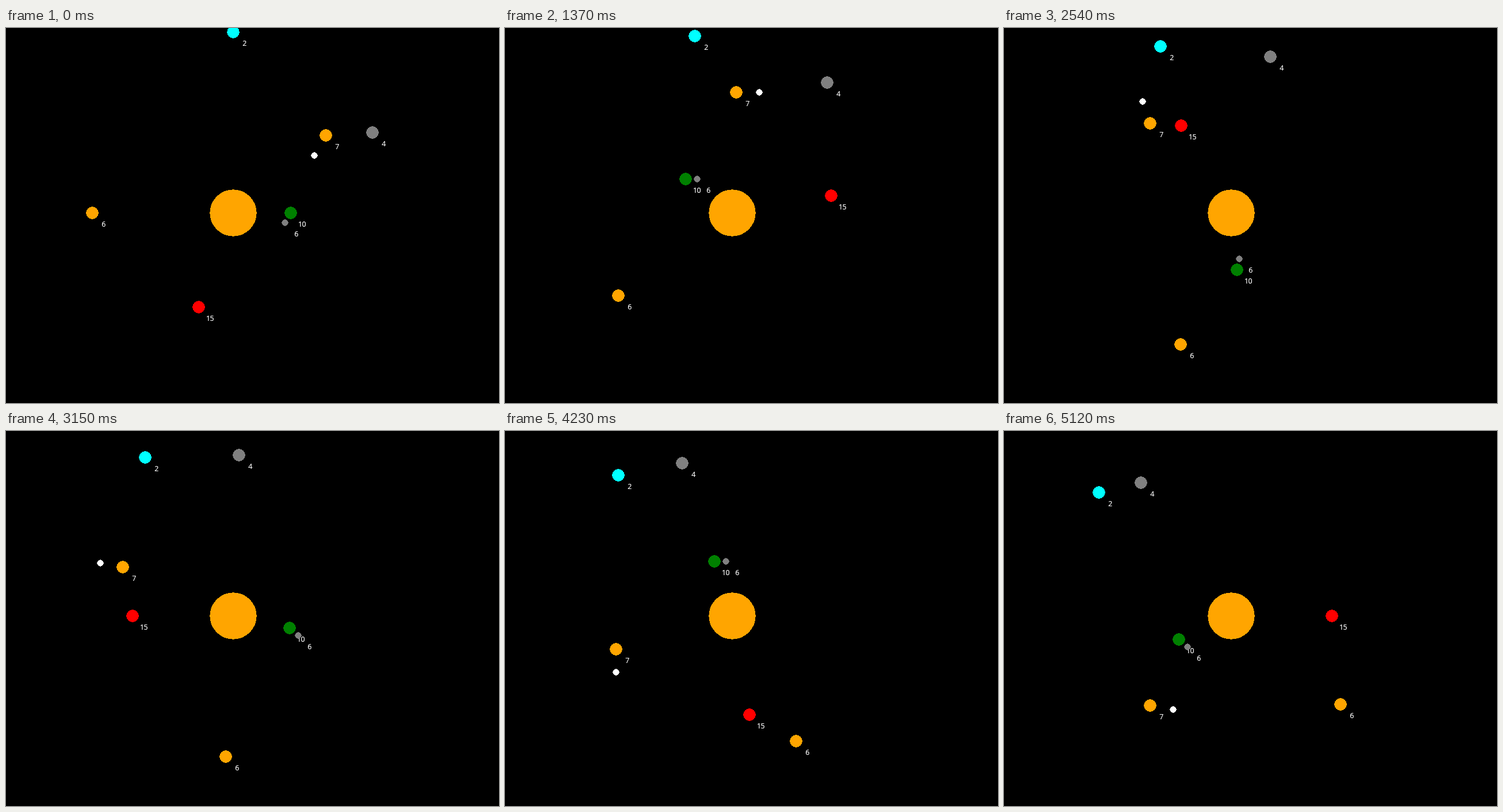
Animation, 857 px wide and 653 px high, one loop 5180 ms. Source, as an HTML page:

```html
<!DOCTYPE html>
<html lang="en">
<head>
<meta charset="utf-8">
<title>Orbits</title>
<style>
  html, body { margin: 0; width: 100%; height: 100%; overflow: hidden; background: #000; }
  svg { display: block; }
  circle { shape-rendering: crispEdges; }
  text {
    font: 12.4px "Open Sans", "Noto Sans", sans-serif;
    letter-spacing: -0.5px;
    fill: #fff;
    stroke: #fff;
    stroke-width: 0.2px;
    text-anchor: middle;
  }
</style>
</head>
<body>
<svg id="sky" width="857" height="653"></svg>
<script>
const LOOP = 5180, FRAME = 68.16;
const sky = document.getElementById("sky");

function add(tag, attrs) {
  const el = document.createElementNS("http://www.w3.org/2000/svg", tag);
  for (const name in attrs) el.setAttribute(name, attrs[name]);
  return sky.appendChild(el);
}

// Angles are in degrees, counterclockwise; speed is degrees per tick.
function body(color, size, parent, orbit, start, speed, label) {
  const dot = add("circle", { r: size + 0.7, fill: color });
  const text = label && add("text", {});
  if (text) text.textContent = label;
  return { dot, text, parent, orbit, start, speed, x: 395, y: 322 };
}

const sun = body("orange", 40, null, 0, 0, 0);
const green = body("green", 10, sun, 100, 0, 12, "10");
const greenMoon = body("gray", 5, green, 20, 240, 40, "6");
const red = body("red", 10, sun, 175, 250, 10, "15");
const amber = body("orange", 10, sun, 210, 40, 4, "7");
const whiteMoon = body("white", 5, amber, 40, 240, 10);
const outer = body("orange", 10, sun, 245, 180, 3, "6");
const gray = body("gray", 10, sun, 280, 30, 2, "4");
const cyan = body("cyan", 10, sun, 315, 90, 1, "2");
const bodies = [sun, green, greenMoon, red, amber, whiteMoon, outer, gray, cyan];

function place(b, tick) {
  if (b.parent) {
    const a = (b.start + b.speed * tick) % 360 * Math.PI / 180;
    b.x = b.parent.x + b.orbit * Math.cos(a);
    b.y = b.parent.y - b.orbit * Math.sin(a);
  }
  const x = Math.round(b.x), y = Math.round(b.y);
  b.dot.setAttribute("cx", x);
  b.dot.setAttribute("cy", y);
  if (b.text) {
    b.text.setAttribute("x", x + 19.5);
    b.text.setAttribute("y", y + 24);
  }
}

// The planets advance five ticks for every eight screen frames.
function draw(now) {
  const frame = Math.floor((now % LOOP) / FRAME + 0.1);
  const tick = Math.floor(frame * 5 / 8 + 0.4);
  bodies.forEach(b => place(b, tick));
}

const began = performance.now();
function loop() {
  draw(performance.now() - began);
  requestAnimationFrame(loop);
}
loop();
</script>
</body>
</html>
```
